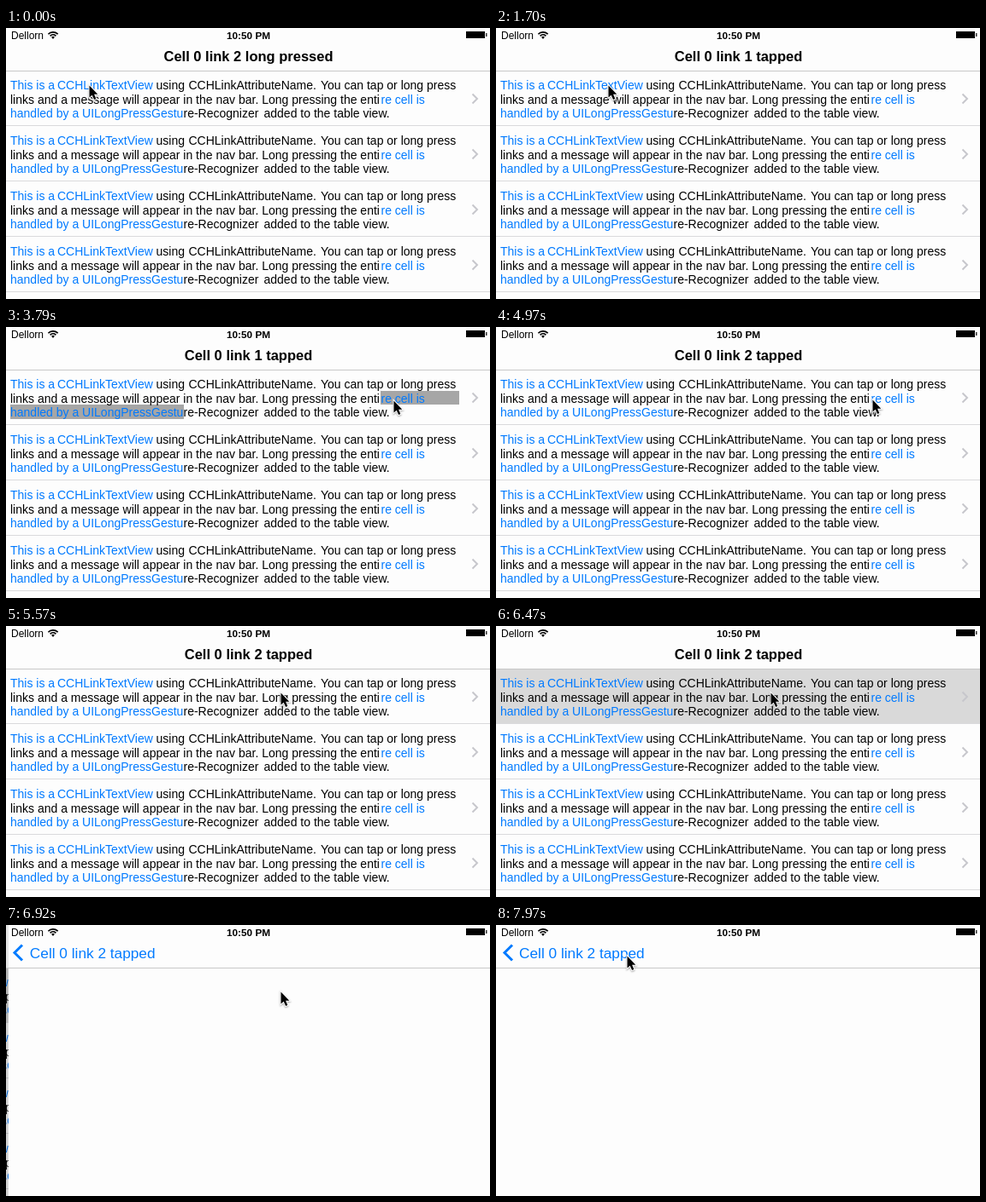
Animation of 566x318 px, one loop 8 s. Source, as an HTML page with a canvas:

```html
<!DOCTYPE html>
<html lang="en">
<head>
<meta charset="utf-8">
<title>Link text view demo</title>
<style>
  html, body { margin: 0; overflow: hidden; background: #fff; }
  canvas { display: block; }
</style>
</head>
<body>
<canvas id="stage" width="566" height="318"></canvas>
<script>
const W = 566, H = 318, NAV = 50, ROW = 65, LOOP = 8000, PUSH = 6470;
const BLUE = '#007aff', PAPER = '#fdfdfd';
const ctx = document.getElementById('stage').getContext('2d');

// Pointer positions, each held until the next: time, x, y
const pointer = [
  [0, 97, 67], [1700, 131, 67], [1850, 252, 86], [2000, 329, 98],
  [2300, 420, 95], [2450, 453, 90], [2750, 453, 88], [2900, 453, 86],
  [4970, 440, 85], [5120, 405, 83], [5270, 364, 80], [5420, 334, 78], [5570, 321, 78],
  [7520, 292, 71], [7670, 229, 55], [7820, 173, 41], [7970, 153, 36]
];

// Cell text: string, x, baseline offset, colour
const cellText = [
  ['This is a', 5, 21, BLUE],
  ['CCHLinkTextView', 60, 21, BLUE],
  ['using', 175.5, 21, '#000'],
  ['CCHLinkAttributeName.', 213.5, 21, '#000'],
  ['You can tap or long press', 368, 21, '#000'],
  ['links and a message will appear in the nav bar. Long pressing the enti', 5, 38, '#000'],
  ['re cell is', 438.5, 38, BLUE],
  ['handled by a UILongPressGestu', 5, 54, BLUE],
  ['re-Recognizer', 207.5, 54, '#000'],
  ['added to the table view.', 301.5, 54, '#000']
];

function rect(x, y, w, h, color) {
  ctx.fillStyle = color;
  ctx.fillRect(x, y, w, h);
}

function text(str, x, y, size, color, weight = '', align = 'left') {
  ctx.font = `${weight} ${size}px "Liberation Sans", Arial, sans-serif`;
  ctx.textAlign = align;
  ctx.fillStyle = color;
  ctx.fillText(str, x, y);
}

function line(points, color, width) {
  ctx.beginPath();
  points.forEach(([x, y]) => ctx.lineTo(x, y));
  ctx.strokeStyle = color;
  ctx.lineWidth = width;
  ctx.stroke();
}

function titleAt(t) {
  if (t < 650) return 'Cell 0 link 2 long pressed';
  return t < 3930 ? 'Cell 0 link 1 tapped' : 'Cell 0 link 2 tapped';
}

// Critically damped spring, sampled every 150 ms
function pushProgress(t) {
  if (t < PUSH) return 0;
  const elapsed = Math.floor((t - PUSH) / 150) * 150;
  if (elapsed >= 600) return 1;
  const a = Math.max(0, (elapsed - 43) * 0.01826);
  return 1 - (1 + a) * Math.exp(-a);
}

function drawTable(t, p) {
  ctx.save();
  ctx.translate(-0.3 * W * p, 0);
  rect(0, NAV, W, H, PAPER);
  if (t >= PUSH) rect(0, NAV, W, ROW, '#d9d9d9');
  const mark = (x, y, w, h) => rect(x, y, w, h, '#a6a6a6');
  if (t >= 500 && t < 650) mark(34, 59, 138, 16);
  if (t >= 3790 && t < 3930) {
    mark(438, 75, 92, 16);
    mark(5, 91, 203, 17);
  }
  for (let top = NAV + 1; top < H; top += ROW) {
    rect(0, top + ROW - 2, W, 1, '#dadadc');
    cellText.forEach(([str, x, y, color]) => text(str, x, top + y, 14, color));
    line([[545.5, top + 26.5], [551, top + 32], [545.5, top + 37.5]], '#c7c7cc', 2);
  }
  ctx.restore();
}

function drawDetail(p) {
  if (p === 0) return;
  const left = W * (1 - p);
  rect(0, NAV, left, H, `rgba(0,0,0,${0.1 * p})`);
  const shadow = ctx.createLinearGradient(left - 8, 0, left, 0);
  shadow.addColorStop(0, 'rgba(0,0,0,0)');
  shadow.addColorStop(1, 'rgba(0,0,0,0.1)');
  rect(left - 8, NAV, 8, H, shadow);
  rect(left, NAV, W, H, PAPER);
}

function drawNav(t, p) {
  rect(0, 0, W, NAV, PAPER);
  if (p > 0) rect(0, 0, W * (1 - p) * 1.05, NAV, `rgba(0,0,0,${0.09 * p})`);
  rect(0, NAV, W, 1, '#c8c8c8');

  const title = titleAt(t);
  ctx.globalAlpha = (1 - p) ** 2;
  text(title, W / 2 + 0.5 - 166 * p, 39, 16.5, '#000', 'bold', 'center');
  ctx.globalAlpha = Math.max(0, (p - 0.55) / 0.45);
  text(title, 27 + 166 * (1 - p), 39, 17.25, BLUE);
  line([[19, 23.5], [10, 32.5], [19, 41.5]], BLUE, 3);
  ctx.globalAlpha = 1;
}

function drawStatus() {
  text('Dellorn', 6, 13, 12, '#000');
  text('10:50 PM', 283.5, 13, 11.8, '#000', 'bold', 'center');
  const fan = [-Math.PI * 0.76, -Math.PI * 0.24];
  ctx.strokeStyle = ctx.fillStyle = '#000';
  ctx.lineWidth = 1.7;
  for (const r of [4.6, 7.7]) {
    ctx.beginPath();
    ctx.arc(55, 12.5, r, ...fan);
    ctx.stroke();
  }
  ctx.beginPath();
  ctx.moveTo(55, 13);
  ctx.arc(55, 12.5, 2.6, ...fan);
  ctx.fill();
  rect(538, 4, 22, 8, '#000');
  rect(561, 6, 1.5, 4, '#333');
}

function drawPointer(t) {
  const [, x, y] = pointer.findLast(([start]) => start <= t);
  const arrow = new Path2D('M0 0V14L3.2 11.2L5.6 16.5L7.8 15.6L5.6 10.3H9.8Z');
  ctx.save();
  ctx.translate(x + 0.5, y + 0.5);
  ctx.shadowColor = 'rgba(0,0,0,0.35)';
  ctx.shadowBlur = 2;
  ctx.shadowOffsetY = 1;
  ctx.lineWidth = 2;
  ctx.strokeStyle = '#fff';
  ctx.stroke(arrow);
  ctx.shadowColor = 'transparent';
  ctx.fillStyle = '#000';
  ctx.fill(arrow);
  ctx.restore();
}

const begin = performance.now();

function draw() {
  const t = (performance.now() - begin) % LOOP;
  const p = pushProgress(t);
  drawTable(t, p);
  drawDetail(p);
  drawNav(t, p);
  drawStatus();
  drawPointer(t);
  requestAnimationFrame(draw);
}
draw();
</script>
</body>
</html>
```
